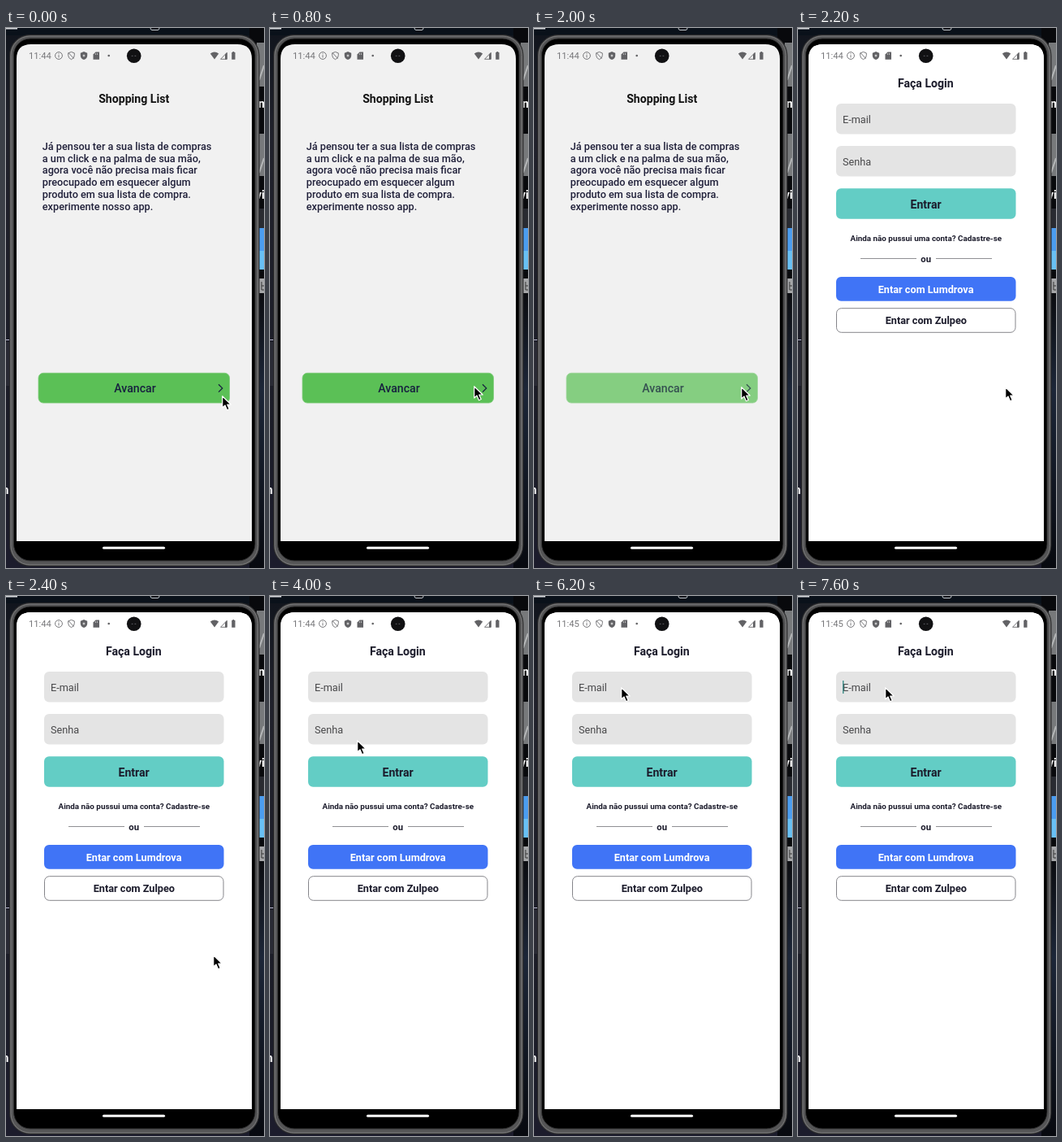
Recreate the animation shown at these times as an HTML page. Size 318 by 664 pixels, loop 8 s.

```html
<!DOCTYPE html>
<html lang="pt-BR">
<head>
<meta charset="utf-8">
<title>Shopping List</title>
<style>
  html, body { margin: 0; width: 100%; height: 100%; overflow: hidden; background: #14151d; }
  svg { display: block; width: 318px; height: 664px; }
  text { font-family: Roboto, sans-serif; fill: #1b1b2b; }
  .mid { text-anchor: middle; }
  .title { font-size: 14.1px; font-weight: 700; }
  .btn { font-size: 12.69px; font-weight: 700; }
  .body text { font-size: 12.69px; font-weight: 500; fill: #20203a; }
  .hint { font-size: 12.69px; fill: #48484a; }
  .clock { font-size: 11.2px; fill: #77777a; }
  .side { font-size: 14px; font-weight: 700; fill: #fff; }

  .step { animation: 8s step-end infinite; }
  .welcome { animation-name: leave; }
  .login { animation-name: enter; }
  .press { animation-name: press; }
  .before { animation-name: before; }
  .after { animation-name: after; }
  .caret { animation-name: blink; }
  .pointer { animation-name: move; }

  @keyframes leave { 0% { visibility: visible } 27.5%, 100% { visibility: hidden } }
  @keyframes enter { 0% { visibility: hidden } 27.5%, 100% { visibility: visible } }
  @keyframes press { 0% { opacity: 1 } 17.5%, 100% { opacity: .72 } }
  @keyframes before { 0% { visibility: visible } 75%, 100% { visibility: hidden } }
  @keyframes after { 0% { visibility: hidden } 75%, 100% { visibility: visible } }
  @keyframes blink {
    0%, 77.5%, 90% { opacity: 0 }
    70%, 82.5%, 95%, 100% { opacity: 1 }
  }
  @keyframes move {
    0% { transform: translate(266px, 452px) }
    2.5% { transform: translate(264px, 450px) }
    5% { transform: translate(259px, 446px) }
    7.5% { transform: translate(254px, 442px) }
    10% { transform: translate(251px, 440px) }
    12.5% { transform: translate(253px, 440px) }
    15% { transform: translate(255px, 441px) }
    45% { transform: translate(219px, 362px) }
    47.5% { transform: translate(139px, 222px) }
    50% { transform: translate(107px, 177px) }
    52.5% { transform: translate(106px, 152px) }
    55% { transform: translate(106px, 123px) }
    57.5%, 100% { transform: translate(107px, 112px) }
  }
</style>
</head>
<body>
<svg viewBox="0 0 318 664">
  <defs>
    <linearGradient id="desk" x2="0" y2="1">
      <stop offset="0" stop-color="#10141c"/>
      <stop offset=".2" stop-color="#20212b"/>
      <stop offset=".75" stop-color="#1b1c27"/>
      <stop offset="1" stop-color="#1c1c2c"/>
    </linearGradient>
    <linearGradient id="night" x2="0" y2="1">
      <stop offset="0" stop-color="#0b0c10"/>
      <stop offset=".35" stop-color="#1c2638"/>
      <stop offset="1" stop-color="#07090f"/>
    </linearGradient>
    <path id="screen" d="M13 631V38Q13 20 31 20H285Q303 20 303 38V631Z"/>
  </defs>

  <!-- desktop -->
  <rect width="318" height="664" fill="url(#desk)"/>
  <rect width="318" height="9" fill="#0a111a"/>
  <rect width="14" height="1.5" fill="#d8dadd"/>
  <path d="M178 0q0 2.5 2 2.5h7q2 0 2-2.5" fill="none" stroke="#c5c8cb"/>
  <rect x="300" width="18" height="664" fill="#08090c"/>
  <rect x="300" y="326" width="18" height="338" fill="url(#night)"/>
  <g fill="#77797b">
    <rect x="309" y="18" width="9" height="54"/>
    <rect x="309" y="130" width="9" height="52"/>
  </g>
  <path d="M312 64l6-18M312 178l6-18" stroke="#b5b7b8" stroke-width="2"/>
  <rect x="309" y="222" width="9" height="24" fill="#292b31"/>
  <rect x="309" y="246" width="9" height="51" fill="#4b9df0"/>
  <rect x="309" y="274" width="9" height="23" fill="#68c0f4"/>
  <rect x="309" y="308" width="9" height="18" fill="#a6a7a9"/>
  <path d="M315 312v10h3M315 317h3" fill="none" stroke="#333"/>
  <text class="side" x="311" y="98">m</text>
  <text class="side" x="308" y="210">vi</text>
  <path d="M0 383.5h5" stroke="#b9b9d0"/>
  <rect y="386" width="5" height="54" fill="#292a34"/>
  <text class="side" x="-4.5" y="573">n</text>

  <!-- phone -->
  <g stroke-width="1">
    <rect x="4.5" y="8.5" width="307.5" height="653" rx="25" fill="#4c4c4d" stroke="#29292a"/>
    <rect x="6" y="10" width="304.5" height="650" rx="23.5" fill="#555556" stroke="#7b7b7c"/>
    <rect x="9.5" y="13" width="297.5" height="642" rx="20.5" fill="#000" stroke="#2c2c2d"/>
  </g>
  <use href="#screen" fill="#f1f1f1"/>
  <rect x="119" y="637.7" width="77" height="3" rx="1.5" fill="#fff"/>

  <!-- welcome screen -->
  <g class="step welcome">
    <text class="title mid" x="157.7" y="92" style="fill:#111">Shopping List</text>
    <g class="body">
      <text x="44.8" y="150">Já pensou ter a sua lista de compras</text>
      <text x="44.8" y="164.7">a um click e na palma de sua mão,</text>
      <text x="44.8" y="179.4">agora você não precisa mais ficar</text>
      <text x="44.8" y="194.1">preocupado em esquecer algum</text>
      <text x="44.8" y="208.8">produto em sua lista de compra.</text>
      <text x="44.8" y="223.5">experimente nosso app.</text>
    </g>
    <rect class="step press" x="40" y="424.3" width="235.5" height="36.7" rx="6" fill="#5bc056" stroke="#7bcb77" stroke-width=".8"/>
    <text class="title mid step press" x="159" y="448" style="fill:#17203f;font-weight:500">Avancar</text>
    <path class="step press" d="M262 438.2l4.7 4.7l-4.7 4.7" fill="none" stroke="#17203f" stroke-width="1.3"/>
  </g>

  <!-- login screen -->
  <g class="step login">
    <use href="#screen" fill="#fff"/>
    <text class="title mid" x="157.3" y="72.5">Faça Login</text>
    <rect x="47" y="93" width="221.5" height="37.5" rx="6" fill="#e4e4e4"/>
    <text class="hint" x="55" y="117">E-mail</text>
    <rect class="step caret" x="55" y="104" width="1.4" height="16" fill="#3c8c87"/>
    <rect x="47" y="145" width="221.5" height="37.5" rx="6" fill="#e4e4e4"/>
    <text class="hint" x="55" y="169">Senha</text>
    <rect x="47" y="197.3" width="221.5" height="37.5" rx="6" fill="#63cdc5"/>
    <text class="title mid" x="157.6" y="221.5">Entrar</text>
    <text class="mid" x="157.8" y="262" font-size="9.85" font-weight="700">Ainda não pussui uma conta? Cadastre-se</text>
    <path d="M77 283.5h69M170 283.5h69" stroke="#909093"/>
    <text class="mid" x="157.7" y="288" font-size="11.28" font-weight="700">ou</text>
    <rect x="47" y="306" width="221.5" height="29.7" rx="6" fill="#4074f6"/>
    <text class="btn mid" x="157.6" y="326" style="fill:#fff">Entar com Lumdrova</text>
    <rect x="47.5" y="344.7" width="220.5" height="29.6" rx="6" fill="#fff" stroke="#85858a"/>
    <text class="btn mid" x="157.8" y="364.3">Entar com Zulpeo</text>
  </g>

  <!-- status bar -->
  <text class="clock step before" x="28" y="38">11:44</text>
  <text class="clock step after" x="28" y="38">11:45</text>
  <g fill="none" stroke="#77777a">
    <circle cx="65" cy="34" r="4.4"/>
    <path d="M65 33.2v3.2M65 31.2v1"/>
    <path d="M80.5 29.4l3.8 1.5v2.8q0 3.4-3.8 5q-3.8-1.6-3.8-5v-2.8zM77 30.5l6.6 7"/>
    <path d="M264.5 38.3l7.7-7.9v7.9z"/>
  </g>
  <g fill="#626265">
    <path d="M96 29l4.2 1.7v3q0 3.7-4.2 5.4q-4.2-1.7-4.2-5.4v-3z"/>
    <path d="M110.5 29.5h4.5v9.3h-7.5v-6.3z"/>
    <circle cx="126.7" cy="34" r="1.3"/>
    <path d="M251.8 31.5q5.2-4.2 10.4 0L257 38.5z"/>
    <path d="M270 32.5l2.5-2.5v8.5h-2.5z"/>
    <path d="M278.2 30h1.1v-1h2v1h1.2v8.8h-4.3z"/>
  </g>
  <path d="M96 32l.6 1.4 1.4.6-1.4.6-.6 1.4-.6-1.4-1.4-.6 1.4-.6z" fill="#eee"/>
  <path d="M110.4 31v2M112.6 31v2" stroke="#ddd" stroke-width=".7"/>
  <circle cx="157.7" cy="34.3" r="8.8" fill="#111113"/>
  <path d="M154.7 34.3h1.8M158.5 34.3h1.8" stroke="#515156" stroke-width="1.2"/>

  <path class="step pointer" d="M.7.7V15L4 11.9L6.5 17.7L9.2 16.5L6.7 11H11.2Z"
        fill="#000" stroke="#fff" stroke-width="1.2" stroke-linejoin="round"/>
</svg>
</body>
</html>
```
